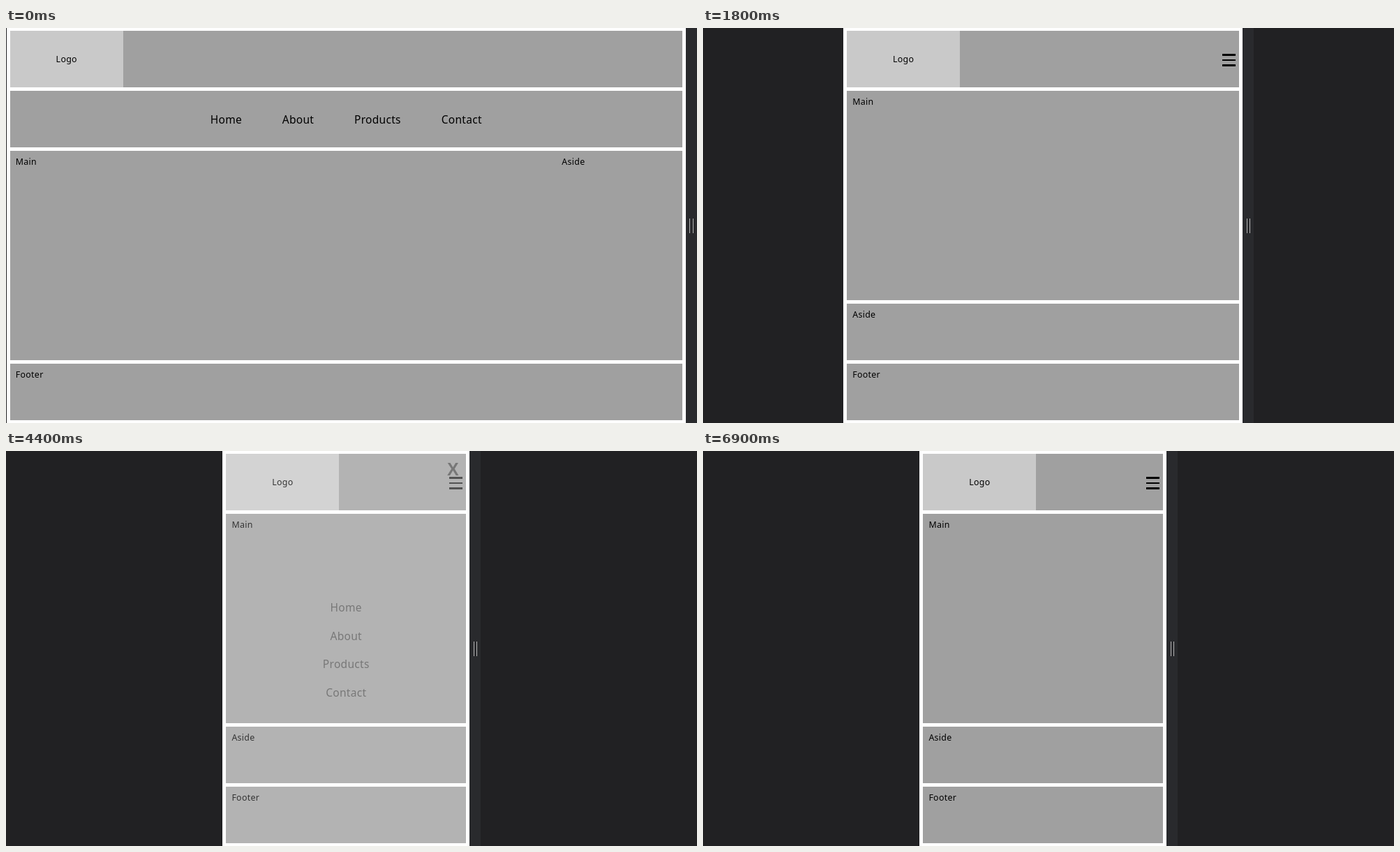
An HTML page that plays this animation: 990 px wide and 566 px high, repeating every 8000 ms.

```html
<!DOCTYPE html>
<html lang="en">
<head>
<meta charset="utf-8">
<title>Responsive layout</title>
<style>
html, body { margin: 0; width: 990px; height: 566px; overflow: hidden; background: #212123; }
body { position: relative; font: 500 12.4px/16px "Noto Sans", "Open Sans", sans-serif; letter-spacing: .3px; color: #000; }
#page, .box, #logo, #burger, #menu, #close, #bar, #grip { position: absolute; box-sizing: border-box; }
#page { top: 0; height: 566px; background: #fff; }
.box { left: 5px; right: 5px; height: 81px; padding: 7.5px 8px; background: #a0a0a0; }
#header { top: 4px; }
#logo { left: 0; top: 0; width: 162px; height: 81px; background: #c9c9c9; text-align: center; line-height: 81px; }
#nav { top: 90px; padding: 0; display: flex; justify-content: center; align-items: center; column-gap: 6%; }
#nav, #menu { font-size: 15.5px; }
#main { top: 176px; height: 300px; right: calc(140.7px + 4.6%); }
#aside { top: 176px; height: 300px; left: auto; width: calc(135.7px + 4.6%); }
#footer { top: 481px; }
#burger { right: 5.5px; top: 33px; width: 19px; height: 18px; display: none; }
#burger i { display: block; height: 2.5px; margin-bottom: 5px; background: #000; }
#menu { inset: 0; padding-top: 204px; background: rgba(255, 255, 255, .8); text-align: center; line-height: 40.5px; opacity: 0; }
#close { right: 15.5px; top: 11px; font: bold 25px/30px "Liberation Sans", Arial, sans-serif; letter-spacing: 0; }
.mobile #nav { display: none; }
.mobile #burger { display: block; }
.mobile #main { top: 90px; right: 5px; }
.mobile #aside { top: 395px; left: 5px; width: auto; height: 81px; }
#bar { top: 0; width: 16px; height: 566px; background: #292a2d; }
#bar.active { background: #35363a; }
#grip { left: 5.5px; top: 273px; width: 5.5px; height: 21px; border: solid #b4b4b4; border-width: 0 1px; }
</style>
</head>
<body>
<div id="bar"><div id="grip"></div></div>
<div id="page">
  <div class="box" id="header">
    <div id="logo">Logo</div>
    <div id="burger"><i></i><i></i><i></i></div>
  </div>
  <div class="box" id="nav"><span>Home</span><span>About</span><span>Products</span><span>Contact</span></div>
  <div class="box" id="main">Main</div>
  <div class="box" id="aside">Aside</div>
  <div class="box" id="footer">Footer</div>
  <div id="menu">
    <div id="close">X</div>
    <div>Home</div><div>About</div><div>Products</div><div>Contact</div>
  </div>
</div>
<script>
const LOOP = 8000, STEP = 100, SPAN = 974.5, BREAKPOINT = 622;
// Drag path of the left edge: step, x, speed per step
const path = [[0, .75, 0], [4, 24.3, 12], [9, 110.9, 19], [18, 259, 12], [19, 269.9, 10], [27, 310.4, 0]];
const $ = id => document.getElementById(id);
const clamp = (v, lo, hi) => Math.min(hi, Math.max(lo, v));

function leftEdge(n) {
  n = clamp(n, 0, 27);
  const i = Math.max(1, path.findIndex(p => p[0] >= n));
  const [n0, x0, v0] = path[i - 1], [n1, x1, v1] = path[i];
  const d = n1 - n0, u = (n - n0) / d, w = 1 - u;
  return x0 * w * w * (1 + 2 * u) + x1 * u * u * (3 - 2 * u) + d * u * w * (v0 * w - v1 * u);
}

function draw(time) {
  const tick = Math.floor(time % LOOP / STEP), n = tick - 4;
  const left = leftEdge(n), width = SPAN - 2 * left;
  const page = $("page"), bar = $("bar");
  page.style.left = left + "px";
  page.style.width = width + "px";
  page.className = width < BREAKPOINT ? "mobile" : "";

  // The handle trails by one step while the drag gathers speed
  const lag = n > 1 && n < 6;
  bar.className = lag ? "active" : "";
  bar.style.left = SPAN - leftEdge(lag ? n - 1 : n) + "px";

  const open = tick < 67 ? clamp((tick - 43) / 4, 0, 1) : clamp((69 - tick) / 3, 0, 1);
  $("menu").style.opacity = open;
  $("burger").style.opacity = 1 - open;
}

const start = performance.now();
function frame() {
  draw(performance.now() - start);
  requestAnimationFrame(frame);
}
frame();
</script>
</body>
</html>
```
